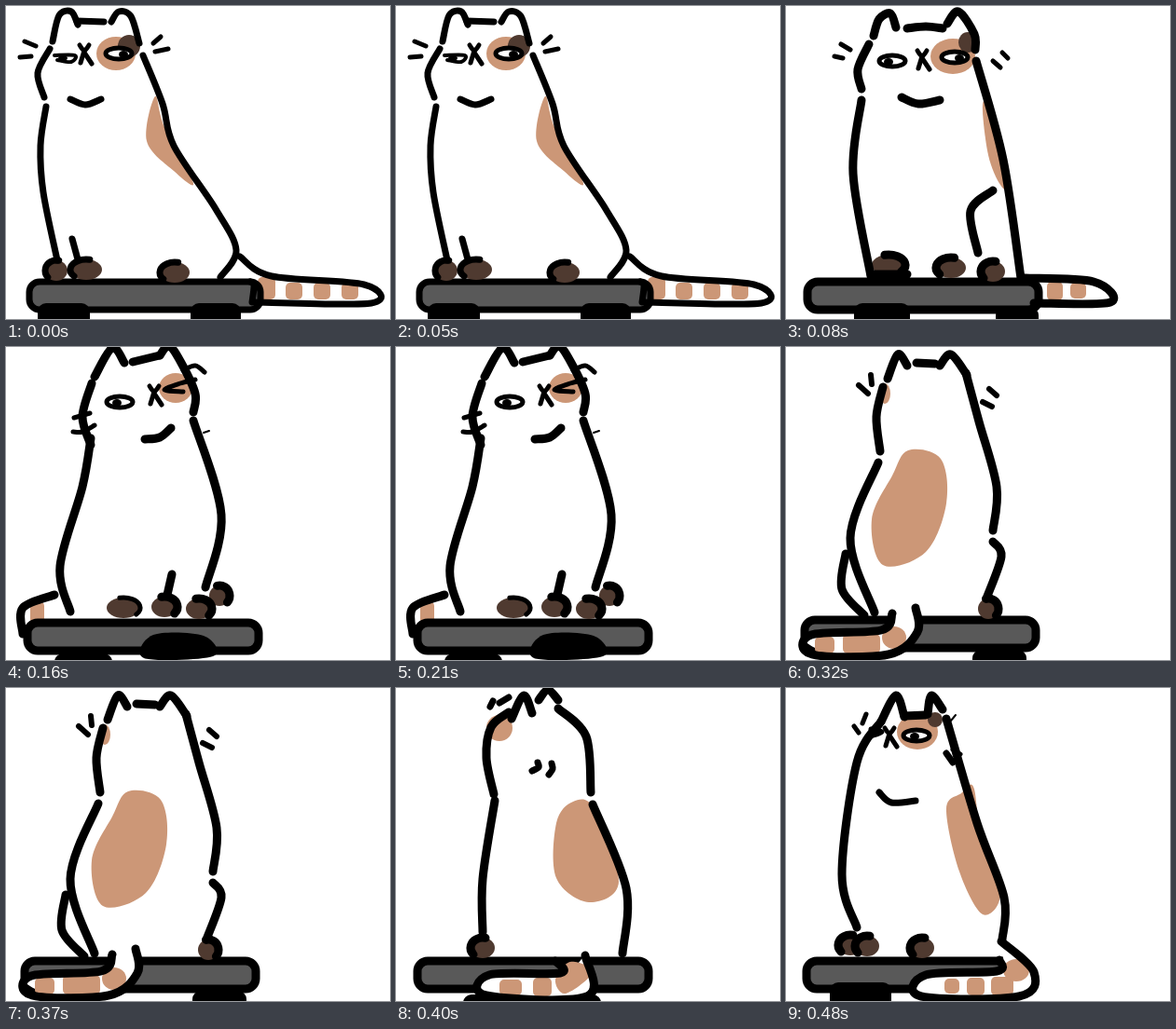
An HTML page with a canvas for the animation above (560 ms loop, 412x336 px).

```html
<!DOCTYPE html>
<html lang="en">
<head>
<meta charset="utf-8">
<title>Cat spinning on a turntable</title>
<style>
html, body { margin: 0; width: 100%; height: 100%; overflow: hidden; background: #fff; }
canvas { display: block; }
</style>
</head>
<body>
<canvas id="stage" width="412" height="336"></canvas>
<script>
const ctx = document.getElementById('stage').getContext('2d');
const TAN = '#cc9777', BROWN = '#4f3a30', GREY = '#595959', INK = '#000', PAPER = '#fff';
const POSE_MS = 80;
ctx.lineCap = ctx.lineJoin = 'round';

// Smooth curve through the points of "x y x y ..."
function curve(text, closed) {
  const p = text.match(/\S+ \S+/g).map(s => s.split(' ').map(Number)), n = p.length;
  const at = i => p[closed ? (i + n) % n : Math.max(0, Math.min(n - 1, i))];
  const bend = (i, axis) => (at(i + 1)[axis] - at(i - 1)[axis]) / 6;
  ctx.beginPath();
  ctx.moveTo(...p[0]);
  for (let i = 0; i < (closed ? n : n - 1); i++) {
    const [x, y] = at(i), [u, v] = at(i + 1);
    ctx.bezierCurveTo(x + bend(i, 0), y + bend(i, 1), u - bend(i + 1, 0), v - bend(i + 1, 1), u, v);
  }
}
function stroke(width) {
  ctx.lineWidth = width;
  ctx.strokeStyle = INK;
  ctx.stroke();
}
function fill(color) {
  ctx.fillStyle = color;
  ctx.fill();
}
const lines = (width, ...paths) => paths.forEach(p => { curve(p); stroke(width); });
const blob = (color, path) => { curve(path, true); fill(color); };
function oval(color, x, y, rx, ry = rx) {
  ctx.beginPath();
  ctx.ellipse(x, y, rx, ry, 0, 0, 7);
  fill(color);
}
function box(x, y, w, h, r) {
  ctx.beginPath();
  ctx.roundRect(x, y, w, h, r);
}
function board(x, y, width = 9) {
  box(x, y, 248, 30, 11);
  fill(GREY);
  stroke(width);
}
const wheel = (x, y, w) => { box(x, y, w, 40, 9); fill(INK); };
const stripe = (x, y, w = 18, h = w) => { box(x, y, w, h, 5); fill(TAN); };
function eye(x, y, look) {
  oval(PAPER, x, y, 14, 6);
  stroke(5);
  oval(INK, x + look, y + 1, 5, 4);
}
function nose(x, y) {
  ctx.save();
  ctx.translate(x, y);
  lines(5, '-5 -6 0 0 5 -6', '0 0 -4 13', '0 2 8 14');
  ctx.restore();
}
// Outlined over the top and down one side: -1 left, 1 right
function paw(x, y, rx, side, width = 9) {
  oval(BROWN, x, y, rx, 11);
  ctx.save();
  ctx.translate(x, y);
  ctx.scale(side, 1);
  ctx.beginPath();
  ctx.ellipse(0, 0, rx, 11, 0, -1.8, 0.7);
  ctx.restore();
  stroke(width);
}

function facingFront() {
  oval(TAN, 118, 51, 21, 18);
  oval(BROWN, 132, 43, 12);
  blob(TAN, '160 97 151 145 180 177 201 190 170 130');
  stripe(270, 291, 19, 24);
  for (let x = 300; x < 370; x += 30) stripe(x, 297);
  board(25, 296, 7);
  lines(7, '262 296 266 300 264 318');
  wheel(34, 319, 56);
  wheel(198, 319, 54);
  paw(54, 284, 12, -1, 7);
  paw(86, 283, 17, -1, 7);
  paw(181, 286, 16, -1, 7);
  lines(7, '50 38 57 10 70 6 77 20', '76 16 105 17', '113 17 121 6 134 11 143 40',
    '47 46 34 72 41 98', '147 53 168 105 180 150 225 218 247 262 230 291',
    '43 108 37 150 40 200 55 273', '69 100 85 106 102 100', '71 250 77 272',
    '251 269 285 290 384 299 392 319 268 318');
  lines(5, '20 38 32 43', '15 55 27 54', '158 40 166 33', '160 49 174 46');
  lines(4, '52 53 74 53 70 60 55 58');
  oval(INK, 61, 56, 5, 3);
  eye(121, 51, 5);
  nose(84, 48);
}

function leaningRight() {
  oval(TAN, 179, 54, 24, 19);
  oval(BROWN, 195, 39, 10, 11);
  blob(TAN, '211 106 217 160 230 192 238 190 222 110');
  stripe(280, 296, 17, 20);
  stripe(305, 297, 17);
  board(23, 296);
  wheel(73, 319, 60);
  wheel(225, 323, 46);
  paw(110, 278, 18, 1);
  paw(177, 281, 16, -1);
  paw(222, 285, 13, -1);
  lines(9, '94 32 100 14 112 8 118 23', '130 24 150 22 168 24', '173 19 185 6 202 30 203 47',
    '89 41 77 68 81 89', '81 101 72 180 91 290', '204 59 233 165 252 292',
    '222 198 198 220 206 265', '91 288 130 288',
    '256 292 330 296 348 318 266 319', '124 98 142 105 165 101');
  lines(5, '59 41 69 47', '52 54 61 56', '222 59 230 66', '232 50 238 56');
  eye(114, 59, -4);
  eye(181, 55, 5);
  nose(146, 54);
}

function turningAway() {
  oval(TAN, 182, 44, 18, 16);
  stripe(26, 273, 15, 24);
  board(23, 296);
  wheel(52, 329, 62);
  blob(INK, '148 334 158 309 212 310 222 332');
  paw(126, 280, 18, 1, 5);
  paw(170, 279, 14, 1);
  paw(229, 267, 11, 1);
  paw(207, 281, 14, 1);
  lines(9, '95 32 114 1 127 17', '136 16 165 9', '165 9 175 -1 188 17 203 50 201 70',
    '92 39 82 75 91 105', '91 98 82 150 58 235 69 284', '201 79 231 180 214 258',
    '149 99 165 97 177 87', '178 244 173 266', '52 266 18 280 18 308');
  lines(5, '190 25 203 20 213 27', '73 76 90 71', '72 91 82 91 95 84',
    '190 48 170 46 187 39 203 35');
  lines(2, '212 92 218 90');
  eye(122, 59, -3);
  nose(159, 48);
}

function sideOn() {
  blob(TAN, '102 101 116 105 122 140 107 196 80 203 90 145');
  board(23, 296);
  box(0, 290, 62, 50, 0);
  fill(PAPER);
  wheel(40, 321, 58);
  wheel(217, 308, 58);
  box(98, 328, 119, 10, 0);
  fill(PAPER);
  blob(PAPER, '40 287 6 306 35 320 70 290');
  oval(TAN, 13, 312, 5, 7);
  oval(TAN, 31, 312, 7, 8);
  oval(TAN, 54, 296, 10, 13);
  paw(144, 277, 15, 1);
  paw(208, 281, 15, 1);
  lines(9, '120 28 97 80 84 180 65 262 42 293', '40 287 6 306 35 320 84 277', '12 301 44 292',
    '121 28 128 5 138 14', '141 25 153 4 166 25', '165 24 196 35 205 65 204 82',
    '206 91 231 180 206 264', '197 248 198 290');
  lines(7, '141 58 152 60', '146 77 154 74');
  lines(5, '98 34 102 20', '107 28 114 15');
  oval(INK, 178, 41, 7);
  oval(PAPER, 176, 38, 2);
}

function fromBehind() {
  blob(TAN, '131 111 166 120 172 168 150 220 104 234 92 185 114 138');
  oval(TAN, 106, 50, 6, 11);
  board(20, 293);
  wheel(200, 325, 58);
  blob(PAPER, '114 286 105 303 21 312 60 332 125 326 139 280');
  stripe(31, 311, 21, 18);
  stripe(61, 308, 40, 21);
  oval(TAN, 116, 312, 13, 12);
  paw(217, 281, 11, 1);
  lines(9, '109 34 120 8 130 20', '140 17 160 18', '165 20 177 8 194 30',
    '193 28 207 80 226 150 222 197', '222 209 231 225 215 270', '104 43 97 75 101 112',
    '99 124 69 205 95 285', '64 222 60 260 84 288',
    '114 286 102 304 27 309 28 330 110 330 141 306 139 280');
  lines(6, '91 30 92 40', '78 41 88 50', '218 45 226 52', '211 59 221 64');
}

function lookingBack() {
  blob(TAN, '190 122 213 130 239 208 207 230 172 204 172 145');
  oval(TAN, 111, 43, 14);
  board(23, 293);
  wheel(72, 329, 148);
  blob(PAPER, '180 305 100 308 97 330 200 330 203 289');
  stripe(111, 313, 24, 17);
  stripe(147, 311, 20);
  blob(TAN, '171 313 187 294 211 305 182 328');
  paw(93, 279, 13, -1);
  lines(9, '124 33 137 8 146 27', '153 13 163 2 174 13', '174 22 204 52 209 112',
    '121 26 102 42 97 75 105 114', '106 121 93 205 93 262', '211 125 247 215 243 285',
    '171 293 176 306 100 308 97 330 205 331 203 287');
  lines(7, '101 20 104 14', '111 16 121 10', '152 80 153 85 146 89', '167 81 168 87 164 93');
}

function comingRound() {
  oval(TAN, 141, 47, 22, 19);
  oval(BROWN, 160, 34, 8);
  blob(TAN, '188 113 201 106 209 155 230 220 211 243 186 197 172 130');
  board(22, 293);
  box(233, 285, 50, 55, 0);
  fill(PAPER);
  wheel(47, 316, 66);
  blob(PAPER, '231 272 266 305 210 332 145 331 150 308 232 300');
  stripe(170, 312, 16);
  stripe(194, 311, 19);
  stripe(220, 310, 24, 20);
  oval(TAN, 247, 303, 14, 12);
  paw(69, 276, 13, -1);
  paw(87, 277, 13, -1);
  paw(146, 279, 13, -1);
  lines(9, '102 36 118 8 127 31', '127 30 150 29', '152 28 156 8 168 23',
    '102 36 76 80 60 200 76 257', '172 33 205 145 234 225 232 270',
    '231 272 266 305 250 331 145 331 150 308 226 304 229 292');
  lines(7, '100 112 113 123 139 121', '172 70 179 80');
  lines(5, '82 38 86 28', '73 41 78 48', '179 66 187 71', '91 44 103 47 91 52');
  lines(2, '177 35 182 29');
  eye(140, 51, -2);
  nose(111, 49);
}

const poses = [facingFront, leaningRight, turningAway, sideOn, fromBehind, lookingBack, comingRound];

function draw() {
  ctx.fillStyle = PAPER;
  ctx.fillRect(0, 0, 412, 336);
  poses[Math.floor(performance.now() / POSE_MS) % poses.length]();
  requestAnimationFrame(draw);
}
draw();
</script>
</body>
</html>
```
